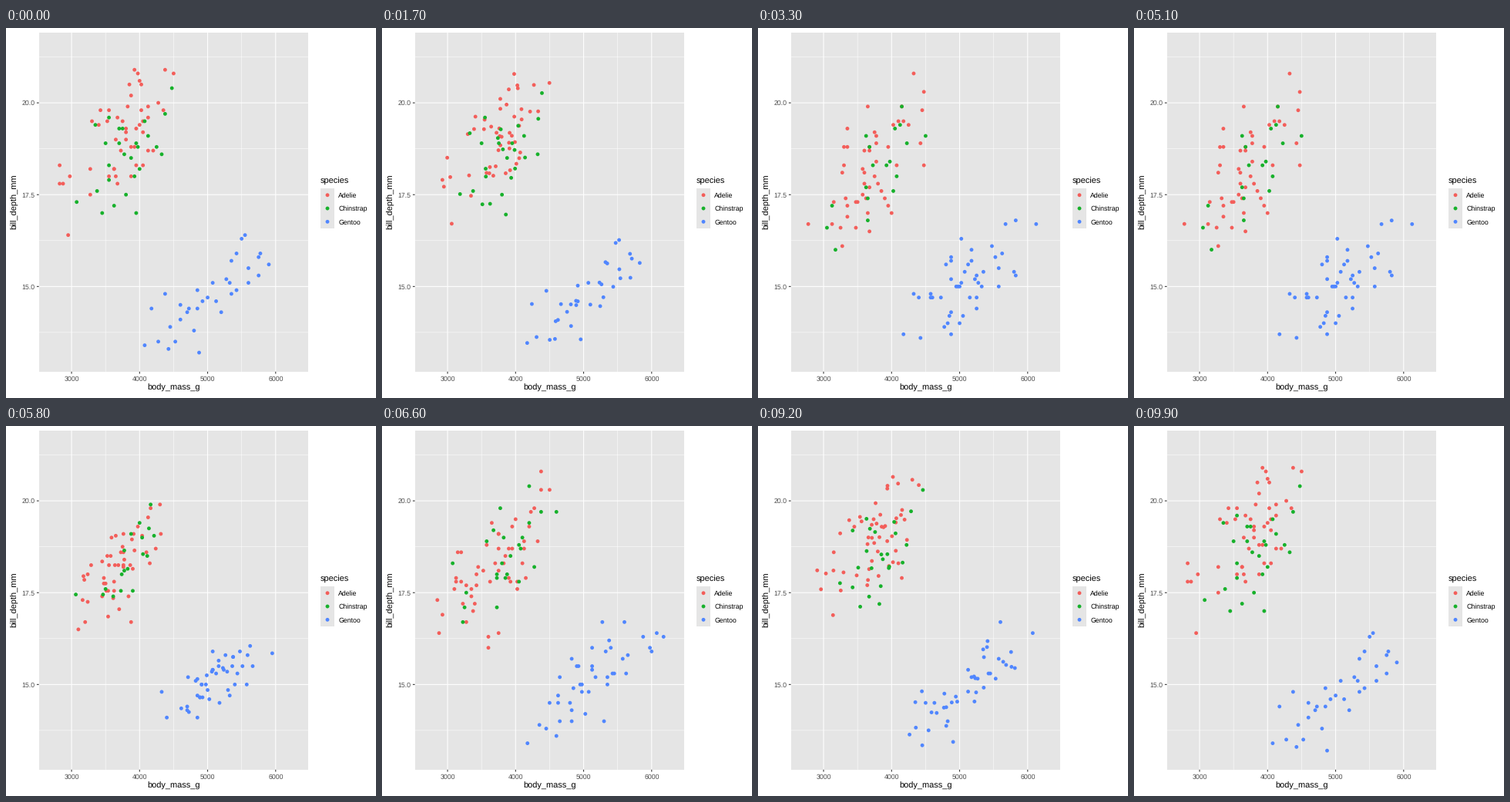
Write a matplotlib script that moves like this. It is 480 by 480 pixels and loops after 10000 ms.

```python
import numpy as np
import matplotlib.pyplot as plt
from matplotlib.animation import FuncAnimation
from matplotlib.patches import Rectangle

plt.rcParams.update({"font.family": "Liberation Sans", "text.hinting": "none"})

SIZE, DPI = 480, 72
FRAMES, INTERVAL = 100, 100
LEFT, RIGHT, TOP, BOTTOM = 42.7, 392.1, 5.6, 445.8
PANEL, TICK, LABEL = "#e5e5e5", "#333333", "#4d4d4d"
COLORS = {"Adelie": "#f35e5a", "Chinstrap": "#17b12b", "Gentoo": "#5086ff"}
DOT = 4.85 ** 2

# Start and end of each move between years, in frames
MOVES = [(10.5, 32.5), (50, 66), (78, 99)]

# Spread of mass and depth, their correlation, then (count, mass, depth) by year
SPECIES = {
    "Adelie": (430, 1.2, 0.58, [(49, 3700, 18.8), (50, 3740, 18.2), (52, 3660, 18.1)]),
    "Gentoo": (500, 0.95, 0.72, [(34, 5070, 14.7), (46, 5020, 14.9), (43, 5140, 15.2)]),
    "Chinstrap": (400, 1.13, 0.6, [(26, 3690, 18.5), (18, 3800, 18.4), (24, 3725, 18.3)]),
}

rng = np.random.default_rng(11)


def px(mass):
    return 85.05 + (mass - 3000) * 0.08825


def py(depth):
    return 335.35 - (depth - 15) * 47.65


def cloud(n, mass, depth, sd_mass, sd_depth, corr):
    """Correlated normal cloud with a cut-off tail, in pixels."""
    u = rng.permutation((np.arange(n) + 0.5) / n)
    r = np.sqrt(-2 * np.log(1 - 0.93 * u))
    angle = rng.uniform(0, 2 * np.pi, n)
    a, b = r * np.cos(angle), r * np.sin(angle)
    b = corr * a + np.sqrt(1 - corr ** 2) * b
    masses = np.round((mass + sd_mass * a) / 25) * 25
    depths = np.round(depth + sd_depth * b, 1)
    return np.column_stack([px(masses), py(depths)])


def ease(t):
    return 4 * t ** 3 if t < 0.5 else 1 - 4 * (1 - t) ** 3


def pose(years, frame):
    """Matched points glide; unmatched ones wait and swap when the move ends."""
    state = 0
    for i, (start, end) in enumerate(MOVES):
        if frame >= end:
            state = (i + 1) % 3
        elif frame > start:
            a, b = years[i], years[(i + 1) % 3]
            n = min(len(a), len(b))
            pts = a.copy()
            pts[:n] += (b[:n] - a[:n]) * ease((frame - start) / (end - start))
            return pts
    return years[state]


fig = plt.figure(figsize=(SIZE / DPI, SIZE / DPI), dpi=DPI, facecolor="white")
ax = fig.add_axes([0, 0, 1, 1])
ax.set_xlim(0, SIZE)
ax.set_ylim(SIZE, 0)
ax.axis("off")


def line(xs, ys, color, width):
    ax.plot(xs, ys, color=color, lw=width, solid_capstyle="butt", snap=False, zorder=1)


def box(x, y, w, h):
    ax.add_patch(Rectangle((x, y), w, h, fc=PANEL, lw=0, zorder=0))


def text(x, y, s, size, color="black", ha="left", **kw):
    ax.text(x, y, s, fontsize=size, color=color, ha=ha, va="baseline", **kw)


box(LEFT, TOP, RIGHT - LEFT, BOTTOM - TOP)
for mass in range(3500, 6000, 1000):
    line([px(mass)] * 2, [TOP, BOTTOM], "white", 0.53)
for depth in np.arange(13.75, 22, 2.5):
    line([LEFT, RIGHT], [py(depth)] * 2, "white", 0.53)
for mass in range(3000, 7000, 1000):
    x = px(mass)
    line([x, x], [TOP, BOTTOM], "white", 1.07)
    line([x, x], [BOTTOM, BOTTOM + 2.75], TICK, 1.07)
    text(x, 458, str(mass), 8.8, LABEL, "center")
for depth in np.arange(15, 21, 2.5):
    y = py(depth)
    line([LEFT, RIGHT], [y, y], "white", 1.07)
    line([LEFT - 2.75, LEFT], [y, y], TICK, 1.07)
    text(LEFT - 4.95, y + 3.2, f"{depth:.1f}", 8.8, LABEL, "right")

text((LEFT + RIGHT) / 2, 470, "body_mass_g", 11, ha="center")
text(13.6, (TOP + BOTTOM) / 2, "bill_depth_mm", 11, ha="center",
     rotation=90, rotation_mode="anchor")

KEY = 17.28
text(408, 201.8, "species", 11)
key_y = 208.1 + KEY * np.arange(3)
for name, y in zip(COLORS, key_y):
    box(408.4, y, KEY, KEY)
    text(431.2, y + 11.8, name, 8.8)
ax.scatter([417] * 3, key_y + KEY / 2, s=DOT, c=list(COLORS.values()), lw=0, zorder=3)

birds = {name: [cloud(*year, *spread) for year in years]
         for name, (*spread, years) in SPECIES.items()}
# One collection with many colours keeps the dots off the pixel grid
dots = ax.scatter([], [], s=DOT, lw=0, zorder=3)


def draw(frame):
    poses = {name: pose(years, frame) for name, years in birds.items()}
    dots.set_offsets(np.vstack(list(poses.values())))
    dots.set_facecolor([COLORS[name] for name, pts in poses.items() for _ in pts])
    return [dots]


anim = FuncAnimation(fig, draw, frames=FRAMES, init_func=lambda: draw(0),
                     interval=INTERVAL, repeat=True, repeat_delay=0, blit=False)
plt.show()
```
